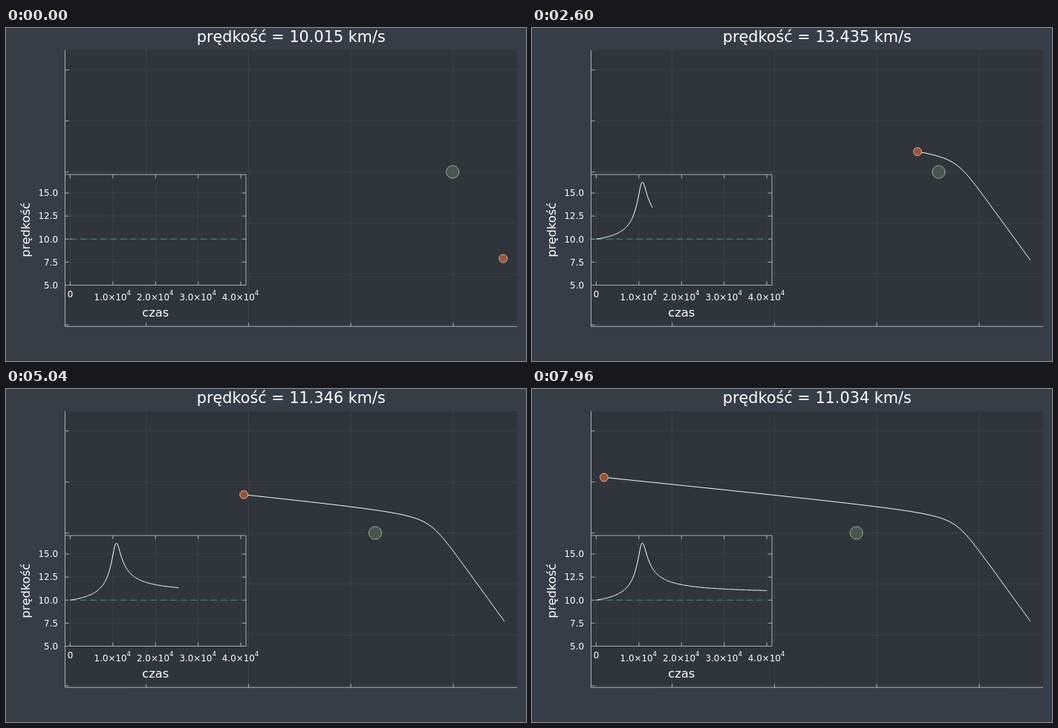
An HTML page with a canvas that plays this animation: 700x450 px, repeating every 8000 ms.

```html
<!DOCTYPE html>
<html lang="pl">
<head>
<meta charset="utf-8">
<title>Asysta grawitacyjna</title>
<style>
html, body { margin: 0; width: 100%; height: 100%; overflow: hidden; background: #363d46; }
canvas { display: block; }
</style>
</head>
<body>
<canvas id="stage" width="700" height="450"></canvas>
<script>
const ctx = document.getElementById('stage').getContext('2d');
const FG = '#adb2b7', GRID = 'rgba(173,178,183,0.1)', INSIDE = '#30343b';
const FRAMES = 200, FRAME_MS = 40, STEP = 200;

// Flyby in km and s, y pointing down; the planet drifts left at 3 km/s.
const GM = 731640, DRIFT = -3, SUB = 10;
const rad = deg => deg * Math.PI / 180;

function slope([x, y, vx, vy]) {
  const k = -GM / Math.hypot(x, y) ** 3;
  return [vx, vy, k * x, k * y];
}
const shift = (s, d, h) => s.map((v, i) => v + d[i] * h);
function rk4(s, h) {
  const a = slope(s), b = slope(shift(s, a, h / 2));
  const c = slope(shift(s, b, h / 2)), d = slope(shift(s, c, h));
  return s.map((v, i) => v + h / 6 * (a[i] + 2 * b[i] + 2 * c[i] + d[i]));
}

// Main plot and inset scales
const KM = 68.9 / 50000, X0 = 602, Y0 = 194.5;
const timeX = t => 86.5 + t * 57.4 / 1e4;
const speedY = v => 347.5 - (v - 5) * 12.45;

// State relative to the planet: 100 000 km away, 10 km/s
let state = [1e5 * Math.cos(rad(60)), 1e5 * Math.sin(rad(60)),
  -10 * Math.cos(rad(54)) - DRIFT, -10 * Math.sin(rad(54))];
const path = [];
for (let i = 0; i <= FRAMES; i++) {
  const t = i * STEP, planet = X0 + DRIFT * t * KM;
  const speed = Math.hypot(state[2] + DRIFT, state[3]);
  path.push({ planet, speed, x: planet + state[0] * KM, y: Y0 + state[1] * KM,
    chart: [timeX(t), speedY(speed)] });
  for (let s = 0; s < STEP; s += SUB) state = rk4(state, SUB);
}

function line(points, color) {
  ctx.beginPath();
  points.forEach(([x, y]) => ctx.lineTo(x, y));
  ctx.strokeStyle = color;
  ctx.stroke();
}
function text(str, x, y, size, align = 'center') {
  ctx.font = size + 'px "DejaVu Sans", sans-serif';
  ctx.textAlign = align;
  ctx.fillStyle = '#fff';
  ctx.fillText(str, x, y);
}
function disc(x, y, r, fill, stroke) {
  ctx.beginPath();
  ctx.arc(x, y, r, 0, 2 * Math.PI);
  ctx.fillStyle = fill;
  ctx.fill();
  ctx.strokeStyle = stroke;
  ctx.stroke();
}
// Grid and inward ticks; `mirror` adds ticks on the top and right sides.
function axes(l, t, r, b, xs, ys, mirror) {
  ctx.fillStyle = INSIDE;
  ctx.fillRect(l, t, r - l, b - t);
  for (const x of xs) {
    line([[x, t], [x, b]], GRID);
    line([[x, b], [x, b - 5]], FG);
    if (mirror) line([[x, t], [x, t + 5]], FG);
  }
  for (const y of ys) {
    line([[l, y], [r, y]], GRID);
    line([[l, y], [l + 5, y]], FG);
    if (mirror) line([[r, y], [r - 5, y]], FG);
  }
  line([[l, t], [l, b], [r, b]], FG);
  if (mirror) line([[l, t], [r, t], [r, b]], FG);
}

const times = [0, 1, 2, 3, 4].map(n => timeX(n * 1e4));
const speeds = [5, 7.5, 10, 12.5, 15];
const mainX = [0, 1, 2, 3].map(k => X0 - 137.8 * k);
const mainY = [-2, -1, 0, 1, 2, 3].map(k => Y0 + 68.9 * k);

function inset(trail) {
  axes(79.5, 198, 323, 347.5, times, speeds.map(speedY), true);
  for (const v of speeds) text(v.toFixed(1), 70, speedY(v) + 4.3, 11.9, 'right');
  text('0', times[0], 364, 11.9);
  times.slice(1).forEach((x, i) => {
    text(i + 1 + '.0×10', x - 25.3, 367.5, 11.9, 'left');
    text('4', x + 18.7, 361, 8.6, 'left');
  });
  text('czas', 201.3, 389.5, 16.35);
  ctx.save();
  ctx.translate(31.5, 272.7);
  ctx.rotate(-Math.PI / 2);
  text('prędkość', 0, 0, 16.35);
  ctx.restore();
  ctx.setLineDash([8.5, 5]);
  line([[times[0], speedY(10)], [times[4], speedY(10)]], '#3f9778');
  ctx.setLineDash([]);
  line(trail.map(p => p.chart), '#fff');
}

function draw(now) {
  const n = Math.floor(now / FRAME_MS) % FRAMES + 1;
  const p = path[n], trail = path.slice(0, n + 1);
  ctx.fillStyle = '#363d46';
  ctx.fillRect(0, 0, 700, 450);
  ctx.lineWidth = 1;
  ctx.lineJoin = 'round';
  axes(79.5, 30, 688, 403.3, mainX, mainY);
  text(`prędkość = ${p.speed.toFixed(3)} km/s`, 383.8, 18.5, 20.8);
  if (n > 1) line(trail.map(q => [q.x, q.y]), '#fff');
  disc(p.planet, Y0, 8.6, 'rgba(143,188,143,0.24)', '#8fbc8f');
  disc(p.x, p.y, 5.5, '#a0522d', 'rgba(255,255,255,0.6)');
  inset(trail);
}

const start = performance.now();
function tick() {
  draw(performance.now() - start);
  requestAnimationFrame(tick);
}
tick();
</script>
</body>
</html>
```
